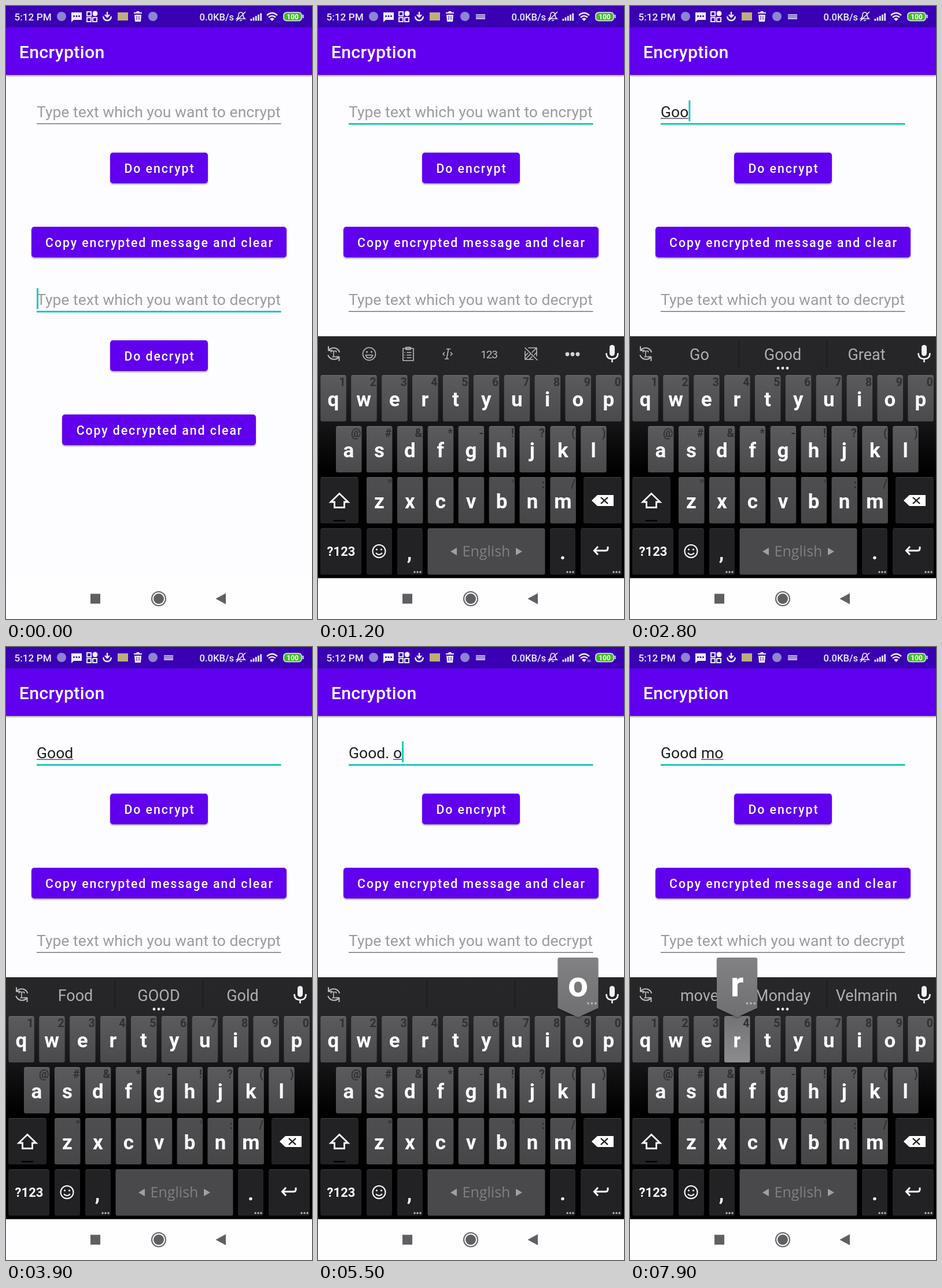
Animation, 529 px wide and 1058 px high, one loop 8000 ms. Source, as an HTML page:

```html
<!DOCTYPE html>
<html lang="en">
<head>
<meta charset="utf-8">
<title>Encryption</title>
<style>
html, body { margin: 0; height: 100%; overflow: hidden; background: #fdfcfe; }
svg { display: block; width: 100vw; height: 100vh; font-family: Roboto, sans-serif; }
.line { fill: none; stroke: #bcbbbd; stroke-width: 2; stroke-linejoin: round; stroke-linecap: round; }
.thin { stroke-width: 1.6; }
.button { font-size: 21.3px; font-weight: 500; letter-spacing: 1.9px; }
.field { font-size: 26.55px; }
.hint { font-size: 19.5px; font-weight: 700; }
.letter { font-size: 35px; font-weight: 700; }
.word { font-size: 27px; }
</style>
</head>
<body>
<svg viewBox="0 0 529 1058">
  <defs>
    <linearGradient id="board" x1="0" y1="0" x2="0" y2="1">
      <stop stop-color="#272629"/><stop offset=".16" stop-color="#252427"/><stop offset=".36" stop-color="#151416"/><stop offset=".56" stop-color="#000"/>
    </linearGradient>
    <linearGradient id="key" x1="0" y1="0" x2="0" y2="1"><stop stop-color="#5b5a5c"/><stop offset="1" stop-color="#4a494b"/></linearGradient>
    <linearGradient id="low" x1="0" y1="0" x2="0" y2="1"><stop stop-color="#4e4d4f"/><stop offset="1" stop-color="#474648"/></linearGradient>
    <linearGradient id="down" x1="0" y1="0" x2="0" y2="1"><stop stop-color="#737274"/><stop offset="1" stop-color="#8c8b8d"/></linearGradient>
    <linearGradient id="balloon" x1="0" y1="0" x2="0" y2="1"><stop stop-color="#828183"/><stop offset="1" stop-color="#6f6e70"/></linearGradient>
    <filter id="shadow" x="-20%" y="-20%" width="140%" height="150%"><feDropShadow dx="0" dy="2" stdDeviation="1.3" flood-opacity=".32"/></filter>
  </defs>
  <g id="scene"></g>
</svg>
<script>
const LOOP = 8000, STEP = 100, BLINK = 500;
const PURPLE = '#6002ee', TEAL = '#1dc9be';
const scene = document.getElementById('scene');
const pen = document.createElement('canvas').getContext('2d');

// Each entry changes part of the state at the given time.
const blank = ['', '', ''];
const timeline = [
  [0, { focus: 1, text: '', key: '', popup: '', caps: false, words: null }],
  [700, { focus: 0 }],
  [1700, { key: 'shift' }],
  [1800, { caps: true }],
  [1900, { key: '' }],
  [2300, { key: 'g', popup: 'G' }],
  [2400, { text: 'G', key: '', popup: '', caps: false, words: ['Go', 'Good', 'Great'] }],
  [2600, { key: 'o', popup: 'o' }],
  [2700, { text: 'Go', key: '' }],
  [2800, { text: 'Goo', popup: '' }],
  [3000, { words: ['Food', 'Good', 'Gold'] }],
  [3300, { key: 'd', popup: 'd' }],
  [3400, { text: 'Good', key: '' }],
  [3500, { popup: '' }],
  [3600, { words: ['Food', 'GOOD', 'Gold'] }],
  [4600, { key: 'space' }],
  [4700, { text: 'Good ' }],
  [4800, { key: '' }],
  [4900, { words: ['night', 'morning', 'luck'] }],
  [5200, { key: 'space' }],
  [5300, { text: 'Good. ', key: '', words: blank }],
  [5400, { key: 'o', popup: 'o' }],
  [5500, { text: 'Good. o', key: '' }],
  [5600, { popup: '' }],
  [5700, { words: ['of', 'on', 'our'] }],
  [5900, { key: 'delete' }],
  [6000, { text: 'Good. ', key: '', words: blank }],
  [6100, { key: 'delete' }],
  [6200, { text: 'Good.', key: '' }],
  [6300, { key: 'delete' }],
  [6400, { text: 'Good', key: '', words: ['GOOD', '*Good', 'Gold'] }],
  [6600, { key: 'space' }],
  [6700, { text: 'Good ', words: ['night', 'morning', 'luck'] }],
  [6800, { key: '' }],
  [7000, { key: 'm', popup: 'm' }],
  [7100, { text: 'Good m', key: '', popup: '' }],
  [7300, { key: 'o', popup: 'o' }],
  [7400, { text: 'Good mo', key: '' }],
  [7500, { popup: '', words: ['move', 'Monday', 'Velmarin'] }],
  [7900, { key: 'r', popup: 'r' }]
];

const rows = [
  { x: 4.3, y: 637, letters: 'qwertyuiop', hints: '1234567890' },
  { x: 31, y: 725, letters: 'asdfghjkl', hints: '@#&*-!?()' },
  { x: 84, y: 813, letters: 'zxcvbnm', hints: '"   \':/' }
];

function stateAt(t) {
  const state = { touched: -300 };
  for (const [time, change] of timeline) {
    if (time > t) break;
    if (time && ('text' in change || 'focus' in change)) state.touched = time;
    Object.assign(state, change);
  }
  return state;
}

const safe = s => s.replace(/&/g, '&amp;');
const text = (s, x, y, fill, extra = '') => `<text x="${x}" y="${y}" fill="${fill}" ${extra}>${safe(s)}</text>`;
const middle = (s, x, y, fill, extra = '') => text(s, x, y, fill, 'text-anchor="middle" ' + extra);
const rect = (x, y, w, h, fill, extra = '') => `<rect x="${x}" y="${y}" width="${w}" height="${h}" fill="${fill}" ${extra}/>`;
const path = (d, fill, extra = '') => `<path d="${d}" fill="${fill}" ${extra}/>`;
const stroke = (d, name = '') => `<path d="${d}" class="line ${name}"/>`;
const circle = (x, y, r, fill, extra = '') => `<circle cx="${x}" cy="${y}" r="${r}" fill="${fill}" ${extra}/>`;
const dots = (x, y, gap, r, fill) => [-gap, 0, gap].map(d => circle(x + d, y, r, fill)).join('');

function textWidth(s) {
  pen.font = '26.55px Roboto, sans-serif';
  return pen.measureText(s).width;
}

function statusBar(t) {
  const white = '#f1edfb';
  let out = rect(0, 0, 529, 37, '#3900b4');
  out += text('5:12 PM', 14.5, 25, white, 'font-size="17.2" font-weight="500"');
  out += circle(96, 18, 8, '#8f83d3') + circle(254, 18, 8, '#8f83d3');
  out += path('M113 11h18v13h-14l-4 4z', white) + dots(122, 17.5, 4.5, 1.5, '#3900b4');
  for (const [x, y] of [[140, 10], [140, 20], [150, 20]])
    out += rect(x, y, 7, 7, 'none', `stroke="${white}" stroke-width="2"`);
  out += circle(154, 13, 4.5, white);
  out += path('M175 10v9m-4-4 4 4 4-4M168 18q1 7 7 7t7-7', 'none', `stroke="${white}" stroke-width="2.4"`);
  out += rect(193, 11, 18, 14, '#bfae78');
  out += path('M221 11h4l1-2h4l1 2h4v2h-14zM222 15h12l-1 12h-10z', white) + path('M226 17v7m4-7v7', 'none', 'stroke="#3900b4"');
  if (t >= 800) {
    out += rect(273, 14, 16, 9, '#b9aae3');
    out += path('M274 16.5h14m-14 2.5h14', 'none', 'stroke="#3900b4" stroke-dasharray="1.4 1.2"');
  }
  out += text('0.0KB/s', 334.5, 25, white, 'font-size="16.6" font-weight="500"');
  out += path('M399 22q3-2 3-6 0-5 4-5t4 5q0 4 3 6zM404 25h4M398 26l16-16', 'none', `stroke="${white}" stroke-width="1.6"`);
  for (let i = 0; i < 5; i++) out += rect(422.5 + i * 4.2, 22 - i * 2.4, 2.7, 3.5 + i * 2.4, white);
  out += path('M451 16q9-8 18 0M454 19.5q6-5 12 0', 'none', `stroke="${white}" stroke-width="2.4"`) + path('M456 22q4-3 8 0l-4 4z', white);
  if (t >= 5200 && t < 5900) out += path('M467 22v4m3-4v4', 'none', `stroke="${white}"`);
  out += rect(480, 11, 31, 14.5, '#45b82c', `rx="5" stroke="${white}" stroke-width="1.6"`) + rect(512.5, 15, 2, 6, white);
  return out + middle('100', 495.5, 22.5, '#fff', 'font-size="12" font-weight="700"');
}

function button(label, x, y, w) {
  return rect(x, y, w, 53, PURPLE, 'rx="5" filter="url(#shadow)"') +
    middle(label, x + w / 2 + 1, y + 35, '#fff', 'class="button"');
}

function field(y, hint, value, focused, caret) {
  let out = text(value || hint, 53, y, value ? '#1e1d1f' : '#9c9b9d', 'class="field"');
  out += focused ? rect(53, y + 10, 422.5, 3, TEAL) : rect(53, y + 10.5, 422.5, 1.5, '#767577');
  const word = value.match(/\w+$/);
  if (word) out += rect(53 + textWidth(value.slice(0, word.index)), y + 1.5, textWidth(word[0]), 1.1, '#1e1d1f');
  if (caret) out += rect(53 + textWidth(value), y - 29, 3, 36, TEAL);
  return out;
}

function page(state, t) {
  const lit = Math.floor((t - state.touched) / BLINK) % 2 === 0;
  return rect(0, 0, 529, 1058, '#fdfcfe') +
    rect(0, 37, 529, 82, PURPLE, 'filter="url(#shadow)"') + statusBar(t) +
    text('Encryption', 22.7, 90, '#fff', 'font-size="30.3" font-weight="500" letter-spacing=".35"') +
    field(192, 'Type text which you want to encrypt', state.text, state.focus === 0, lit && state.focus === 0) +
    button('Do encrypt', 180, 253, 169) +
    button('Copy encrypted message and clear', 44, 381, 441) +
    field(516, 'Type text which you want to decrypt', '', state.focus === 1, lit && state.focus === 1) +
    button('Do decrypt', 180, 577, 169) +
    button('Copy decrypted and clear', 97, 705, 335);
}

function toolbar(words) {
  const grey = '#bcbbbd';
  let out = stroke('M18 588v6.5h6M18.5 594a11 11 0 0 1 18.5 3M36.5 612v-6.5h-6M36 606a11 11 0 0 1-18.5-3') +
    stroke('M22.5 597.5v-2h9v2M27 595.5v10m-2 0h4', 'thin');
  out += rect(504, 585, 9, 19, '#f3f2f4', 'rx="4.5"') +
    path('M498.5 599q0 10 10 10t10-10M508.5 609v6', 'none', 'stroke="#f3f2f4" stroke-width="2.6"');
  if (words) {
    out += rect(187.5, 577, 1.5, 47, '#1a191b') + rect(339.5, 577, 1.5, 47, '#1a191b');
    words.forEach((word, i) => {
      const bold = word[0] === '*';
      out += middle(word.replace('*', ''), [120, 264, 409][i], 611, bold ? '#d0cfd1' : '#b0afb1', `class="word" font-weight="${bold ? 700 : 400}"`);
    });
    return words[1] ? out + dots(264, 625, 8, 2.4, '#e6e5e7') : out;
  }
  out += circle(88.5, 600.5, 11, 'none', 'class="line thin"') + circle(84.5, 597, 1.5, grey) + circle(92.5, 597, 1.5, grey) +
    stroke('M82.5 602.5h12q-1 5-6 5t-6-5z', 'thin');
  out += stroke('M147 591h18v21h-18zM152 591v-2h8v4h-8zM154 598h7m-7 4.5h7m-7 4.5h7M150 598h.1m-.1 4.5h.1m-.1 4.5h.1', 'thin');
  out += stroke('M222.5 592h6M219.5 609h6M225.5 592l-3 17M218.5 598l-2.5 2.5 2.5 2.5M229.5 598l2.5 2.5-2.5 2.5', 'thin');
  out += middle('123', 295.5, 607.5, grey, 'font-size="19" letter-spacing="-1.2"');
  out += stroke('M358 590l21 21M364 590h14v14M358 596v14h14M370 598l8-8M374 602l4-4M358 604l5-5M358 610l9-9M365 610l5-5', 'thin');
  return out + dots(440, 601, 9, 3.4, '#d4d3d5');
}

function key(x, y, w, fill) {
  return rect(x, y, w, 80, fill, 'rx="3"') + rect(x + 2, y, w - 4, 1.2, '#fff', 'opacity=".12"');
}

function keyboard(state) {
  const fill = (name, normal) => state.key === name ? 'url(#down)' : normal;
  const dark = '#222124';
  let out = rect(0, 570, 529, 418, 'url(#board)') + toolbar(state.words);
  rows.forEach((row, r) => [...row.letters].forEach((letter, i) => {
    const x = row.x + 52.9 * i;
    out += key(x, row.y, 44.5, fill(letter, r < 2 ? 'url(#key)' : 'url(#low)'));
    out += text(row.hints[i], x + 43.5, row.y + 19, '#302f31', 'text-anchor="end" class="hint"');
    out += middle(state.caps ? letter.toUpperCase() : letter, x + 22, row.y + 53.5, '#fff', 'class="letter"');
  }));

  out += key(4, 813, 66, fill('shift', dark)) + rect(27, 887, 20, 2.5, '#000');
  out += path('M37 841.5 52 856H45.5v9.5h-17V856H22z', state.caps ? '#fff' : 'none', 'stroke="#fff" stroke-width="2.8"');
  out += key(459, 813, 66, fill('delete', dark)) + path('M473 853.5 483 844h28v19h-28z', '#fff') +
    path('M489 848l12 11m0-11-12 11', 'none', 'stroke="#111" stroke-width="2.2"');

  out += key(4, 901.5, 71, dark) + middle('?123', 40, 949, '#fff', 'font-size="22" font-weight="700"');
  out += key(84, 901.5, 44, dark) + circle(105.5, 941, 11, 'none', 'stroke="#fff" stroke-width="2"') +
    circle(101.5, 938, 1.6, '#fff') + circle(109.5, 938, 1.6, '#fff') + path('M100 944q5.5 6 11 0', 'none', 'stroke="#fff" stroke-width="2"');
  out += key(137, 901.5, 44, dark) + middle(',', 158, 955, '#fff', 'class="letter"') + dots(172, 977, 5, 1.7, '#bbb');
  const pressed = state.key === 'space';
  out += key(189.5, 901.5, 203, pressed ? '#878688' : '#49484a');
  out += path('M240 935v13l-11-6.5zM342 935v13l11-6.5z', pressed ? '#c6c5c7' : '#a09fa1');
  out += middle('English', 291, 950, pressed ? '#747375' : '#807f81', 'font-size="25" font-family="Open Sans, Noto Sans, sans-serif"');
  out += key(401, 901.5, 44, dark) + middle('.', 423, 955, '#fff', 'class="letter"') + dots(436, 977, 5, 1.7, '#bbb');
  out += key(454, 901.5, 71, dark) + path('M484 933l-6.5 7 6.5 7M478 940h19q4 0 4-4v-3', 'none', 'stroke="#fff" stroke-width="3"');
  return out + dots(516, 977, 5, 1.7, '#bbb');
}

function balloon(letter) {
  const row = rows.find(r => r.letters.includes(letter.toLowerCase()));
  const x = row.x + 52.9 * row.letters.indexOf(letter.toLowerCase()) + 22;
  const y = row.y - 101;
  return path(`M${x - 35} ${y + 3}q0-3 3-3h64q3 0 3 3v84L${x} ${y + 103} ${x - 35} ${y + 87}z`, 'url(#balloon)', 'filter="url(#shadow)"') +
    middle(letter, x, y + 67, '#fff', 'font-size="62" font-weight="700"') + dots(x + 24, y + 79, 6.5, 1.9, '#b4b3b5');
}

function navigation() {
  const grey = '#605f61';
  return rect(0, 987.5, 529, 71, '#fefdff') + rect(146, 1014.5, 17, 17, grey) +
    circle(264, 1023, 12, 'none', `stroke="${grey}" stroke-width="2"`) + circle(264, 1023, 9, grey) +
    path('M380 1013.5v19l-17.5-9.5z', grey);
}

function draw(t) {
  const state = stateAt(t);
  let out = page(state, t);
  if (t >= 800) {
    const left = Math.max(0, 1 - (t - 700) / 400);
    out += `<g transform="translate(0 ${417 * left ** 2})">${keyboard(state)}</g>`;
  }
  return out + navigation() + (state.popup ? balloon(state.popup) : '');
}

let shown = -1;
function frame(now) {
  const t = Math.floor(now % LOOP / STEP) * STEP;
  if (t !== shown) scene.innerHTML = draw(shown = t);
  requestAnimationFrame(frame);
}
frame(performance.now());
</script>
</body>
</html>
```
